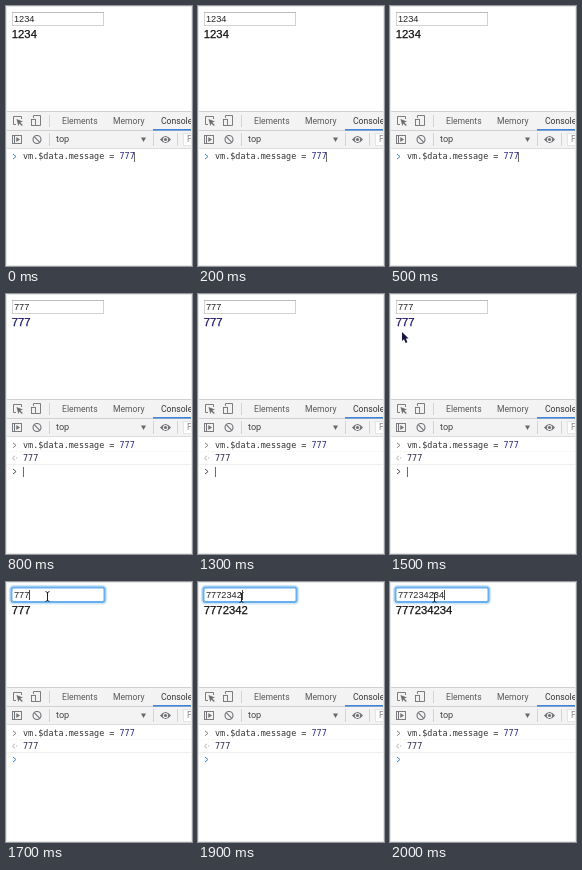
Recreate the animation shown at these times as an HTML page with a canvas. Size 186 by 260 pixels, loop 2.1 s.

```html
<!DOCTYPE html>
<html lang="en">
<head>
<meta charset="utf-8">
<title>Two-way binding in the console</title>
<style>
html, body { margin: 0; width: 100%; height: 100%; overflow: hidden; background: #fff; }
canvas { display: block; }
</style>
</head>
<body>
<canvas id="stage" width="186" height="260"></canvas>
<script>
const ctx = document.getElementById('stage').getContext('2d');
const LOOP = 2100;
const SANS = '"Liberation Sans", Arial, sans-serif';
const UI = 'Roboto, sans-serif';
const MONO = '"DejaVu Sans Mono", monospace';
const ICON = '#6e7074', NAVY = '#2a2a86', BLUE = '#4284d6', CARET = '#6a6a6a';

// Each entry holds from its time until the next one.
const steps = [
  { at: 0, value: '1234', ink: '#111' },
  { at: 800, value: '777', ink: '#1c1660', sent: true },
  { at: 1400, pointer: ['arrow', 10, 47] },
  { at: 1500, pointer: ['arrow', 12, 38] },
  { at: 1600, pointer: ['beam', 34, 16] },
  { at: 1700, pointer: ['beam', 41, 14], focus: true, ink: '#111' },
  { at: 1800, value: '77723', pointer: ['beam', 42, 14] },
  { at: 1900, value: '7772342', pointer: ['beam', 43, 15] },
  { at: 2000, value: '777234234', pointer: ['beam', 44, 15] }
];

const stateAt = time =>
  Object.assign({}, ...steps.filter(step => step.at <= time));

function rect(x, y, w, h, color) {
  ctx.fillStyle = color;
  ctx.fillRect(x, y, w, h);
}

function text(str, x, y, size, family, color, bold = 0) {
  ctx.font = `${size}px ${family}`;
  ctx.fillStyle = color;
  ctx.fillText(str, x, y);
  if (bold) {
    ctx.strokeStyle = color;
    ctx.lineWidth = bold;
    ctx.strokeText(str, x, y);
  }
  return x + ctx.measureText(str).width;
}

function line(points, color, width = 1) {
  ctx.beginPath();
  points.forEach(([x, y]) => ctx.lineTo(x, y));
  ctx.strokeStyle = color;
  ctx.lineWidth = width;
  ctx.stroke();
}

function shape(points, color) {
  ctx.beginPath();
  points.forEach(([x, y]) => ctx.lineTo(x, y));
  ctx.closePath();
  ctx.fillStyle = color;
  ctx.fill();
}

function disc(x, y, radius, color) {
  ctx.beginPath();
  ctx.arc(x, y, radius, 0, Math.PI * 2);
  ctx.fillStyle = color;
  ctx.fill();
}

function frame(x, y, w, h, color, width = 1) {
  ctx.strokeStyle = color;
  ctx.lineWidth = width;
  ctx.strokeRect(x + 0.5, y + 0.5, w - 1, h - 1);
}

function ring(x, y, w, h, radius, color, width) {
  ctx.beginPath();
  ctx.roundRect(x, y, w, h, radius);
  ctx.strokeStyle = color;
  ctx.lineWidth = width;
  ctx.stroke();
}

function chevron(y, color) {
  line([[7, y - 2.5], [10, y], [7, y + 2.5]], color);
}

function page({ value, focus, ink }) {
  if (focus) {
    ring(4.5, 4.5, 95, 16.5, 3, '#cfe5f8', 3);
    ring(5.5, 5.5, 93, 14.5, 2, '#69b0ec', 2);
  } else {
    frame(6, 6, 92, 14, '#d2d2d2');
    rect(6, 6, 92, 1, '#bcbcbc');
  }
  const end = text(value, 8, 16.4, 9.2, SANS, '#222');
  if (focus) rect(Math.round(end), 8, 1, 10, '#444');
  text(value, 5.8, 32.3, 11.3, SANS, ink, 0.25);
}

function tabBar() {
  rect(0, 105, 186, 37, '#f3f3f3');
  rect(0, 105, 186, 1, '#d0d0d0');
  rect(0, 124, 186, 1, '#d0d0d0');
  rect(0, 142, 186, 1, '#dcdcdc');

  // element picker
  line([[10, 118.5], [7.5, 118.5], [7.5, 110.5], [15.5, 110.5], [15.5, 113]], ICON, 0.9);
  shape([[10.5, 113], [17, 115.5], [14.3, 116.6], [16.8, 119], [15.8, 120],
    [13.4, 117.6], [12.3, 120]], ICON);

  // device toggle
  line([[27.5, 112], [27.5, 109.5], [34.5, 109.5], [34.5, 119.5], [30, 119.5]], ICON, 0.9);
  frame(25, 113, 5, 7, ICON, 0.9);

  rect(43, 109, 1, 12, '#d4d4d4');
  text('Elements', 56, 118, 8.6, UI, '#5a5a5a');
  text('Memory', 107, 118, 8.6, UI, '#5a5a5a');
  text('Console', 155, 118, 8.6, UI, '#333');
  rect(147, 123, 39, 1.6, BLUE);
}

function filterBar() {
  frame(6, 129, 10, 9, ICON, 0.9);
  rect(8, 130, 1, 7, ICON);
  shape([[10.3, 131], [14, 133.5], [10.3, 136]], ICON);

  ring(27, 129.5, 8, 8, 4, ICON, 1.1);
  line([[28.2, 130.7], [33.8, 136.3]], ICON, 1.1);

  [43, 147, 171].forEach(x => rect(x, 127, 1, 13, '#d4d4d4'));
  text('top', 50, 136.4, 9.1, UI, '#444');
  shape([[135, 131.5], [140, 131.5], [137.5, 136]], '#6a6a6a');

  // eye
  ctx.beginPath();
  ctx.moveTo(154, 133.5);
  ctx.quadraticCurveTo(159.5, 126.5, 165, 133.5);
  ctx.quadraticCurveTo(159.5, 140.5, 154, 133.5);
  ctx.fillStyle = ICON;
  ctx.fill();
  disc(159.5, 133.5, 2.6, '#f3f3f3');
  disc(159.5, 133.5, 1.6, ICON);

  rect(177, 127, 9, 13, '#fff');
  frame(177, 127, 12, 13, '#e4e4e4');
  text('F', 181, 136.4, 8.6, UI, '#888');
}

function consoleRows({ sent, focus }) {
  const size = 8.45;
  const baseline = sent ? 154 : 153.2;
  const x = text('vm.$data.message = ', 17, baseline, size, MONO, '#333');
  const end = text('777', x, baseline, size, MONO, NAVY);
  if (!sent) {
    chevron(150.5, BLUE);
    rect(Math.round(end - 0.5), 146, 1, 10, CARET);
    return;
  }
  chevron(151.3, '#8a8a8a');
  line([[9, 161.7], [6.5, 164], [9, 166.3]], '#b0b0b0');
  rect(10, 163.5, 1, 1, '#b0b0b0');
  text('777', 17, 167, size, MONO, '#2c2c54');
  rect(1, 157, 184, 1, '#f9f9f9');
  rect(1, 170, 184, 1, '#f0f0f0');
  chevron(177.5, focus ? BLUE : '#4b5878');
  if (!focus) rect(17, 173, 1, 10, CARET);
}

function pointer([kind, x, y]) {
  if (kind === 'beam') {
    line([[x - 1.5, y - 4.5], [x + 0.5, y - 3.5], [x + 2.5, y - 4.5]], '#222');
    line([[x + 0.5, y - 4], [x + 0.5, y + 5]], '#222');
    line([[x - 1.5, y + 5.5], [x + 0.5, y + 4.5], [x + 2.5, y + 5.5]], '#222');
    return;
  }
  const outline = [[0, 0], [0, 9], [2, 7.2], [3.6, 11], [5.4, 10.2],
    [3.9, 6.6], [6.6, 6.4]].map(([dx, dy]) => [x + dx, y + dy]);
  line([...outline, outline[0]], '#fff', 2);
  shape(outline, '#15153f');
}

function draw(now) {
  const state = stateAt(now % LOOP);
  rect(0, 0, 186, 260, '#fff');
  page(state);
  tabBar();
  filterBar();
  consoleRows(state);
  frame(0, 0, 186, 260, '#e6e6e6');
  if (state.pointer) pointer(state.pointer);
}

const start = performance.now();
function tick() {
  draw(performance.now() - start);
  requestAnimationFrame(tick);
}
tick();
</script>
</body>
</html>
```
